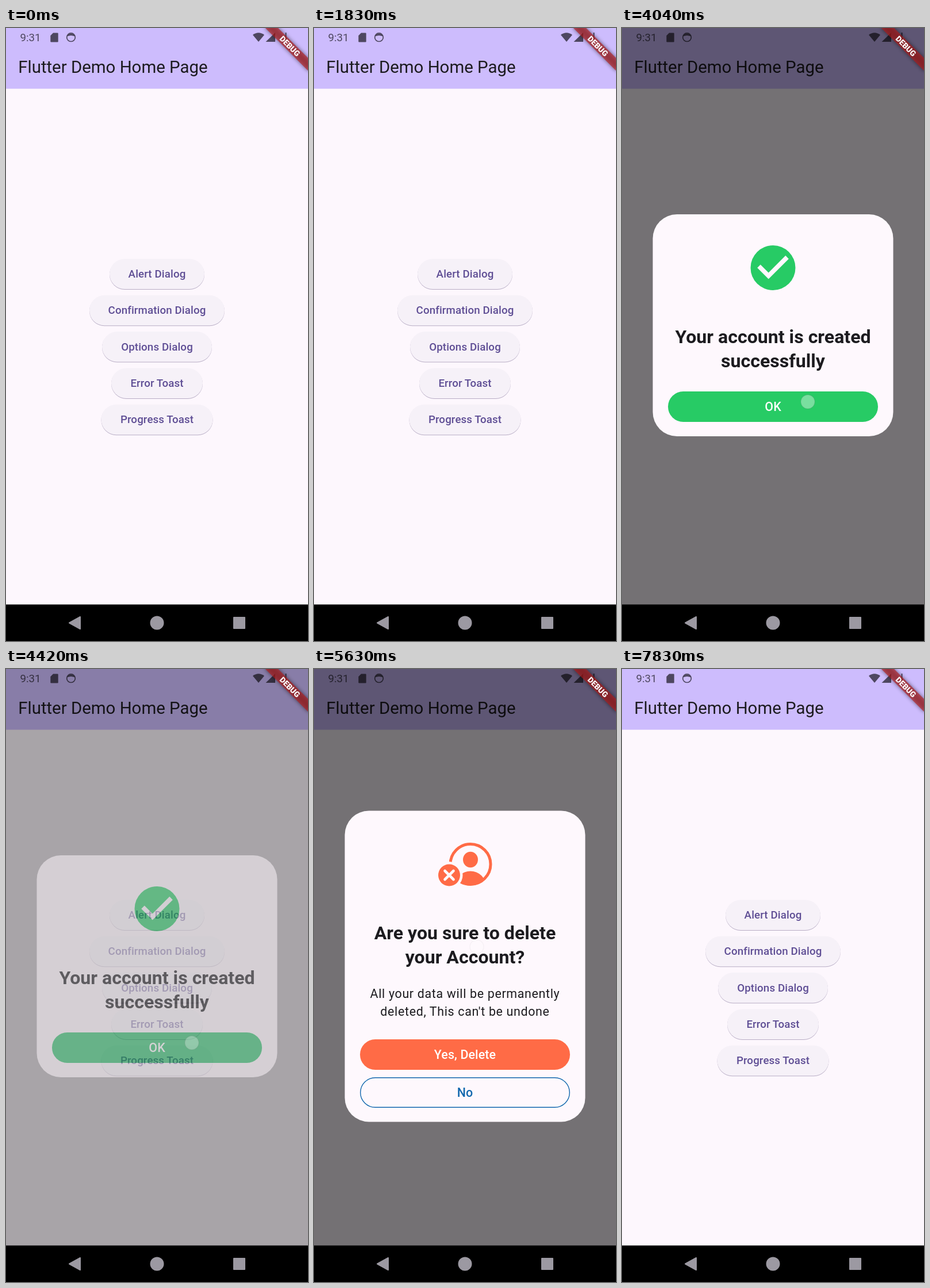
These frames come from a looping animation (525 px wide and 1066 px high, 8 s). An HTML page:

```html
<!DOCTYPE html>
<html lang="en">
<head>
<meta charset="utf-8">
<title>Dialog demo</title>
<style>
  html, body { margin: 0; width: 100%; height: 100%; overflow: hidden; background: #fdf7fd; }
  svg { display: block; width: 100%; height: 100%; }
  text { font-family: Roboto, sans-serif; }
  .mid { text-anchor: middle; }
  .label { font-size: 18.7px; font-weight: 500; letter-spacing: .13px; fill: #5f4e95; }
  .pill { fill: #f6f1f8; filter: drop-shadow(0 1px .7px rgba(40, 20, 80, .32)); }
  .head { font-size: 32.1px; font-weight: 700; fill: #1c1b1f; }
  .body { font-size: 21.4px; letter-spacing: .67px; fill: #1c1b1f; }
  .action { font-size: 21.4px; font-weight: 500; letter-spacing: .13px; fill: #fff; }
  .card { fill: #fef8fd; }
  .ink { fill: #6750a4; }
</style>
</head>
<body>
<svg viewBox="0 0 525 1066" preserveAspectRatio="none">
  <defs>
    <filter id="blur" x="-30%" y="-100%" width="160%" height="300%"><feGaussianBlur stdDeviation="3.5"/></filter>
    <clipPath id="face"><circle cx="272" cy="339.5" r="37"/></clipPath>
  </defs>

  <rect width="525" height="1066" fill="#fdf7fd"/>
  <rect width="525" height="105.6" fill="#cdbcfd"/>
  <g fill="#000" fill-opacity=".62">
    <text x="24.5" y="23.2" font-size="18.7">9:31</text>
    <path d="M82 8.5h7.5q1.2 0 1.2 1.2v13.6q0 1.2-1.2 1.2h-11q-1.2 0-1.2-1.2v-10z"/>
    <circle cx="113" cy="16.2" r="7.3" fill="none" stroke="#000" stroke-opacity=".62" stroke-width="1.7"/>
    <path d="M106.5 14.5a7 7 0 0 1 13 0q-3-1.5-6.5-1.5t-6.5 1.5z"/>
    <path d="M429 12q10-7.5 20 0l-10 12z"/>
    <path d="M468 8v16h-16.5z"/>
    <rect x="485.5" y="8" width="2" height="15"/>
  </g>
  <text x="21.3" y="78" font-size="29.4" fill="#1c1b1f">Flutter Demo Home Page</text>
  <g id="menu"></g>

  <rect id="barrier" width="525" height="1003"/>

  <g id="alert">
    <rect class="card" x="53.5" y="324" width="418" height="386" rx="42"/>
    <circle cx="262.5" cy="417" r="39" fill="#27cb65"/>
    <path class="card" transform="translate(215.7 370.2) scale(3.9)"
      d="M10 17l-5-5 1.41-1.41L10 14.17l7.59-7.59L19 8z"/>
    <text class="head mid" x="262.5" y="547.5">Your account is created</text>
    <text class="head mid" x="262.5" y="589.7">successfully</text>
    <rect x="80" y="632" width="365" height="53" rx="26.5" fill="#27cb65"/>
    <rect class="ink" x="80" y="632" width="365" height="53" rx="26.5"/>
    <text class="action mid" x="262.5" y="666">OK</text>
  </g>

  <g id="confirm">
    <rect class="card" x="53.5" y="246.5" width="418" height="541" rx="42"/>
    <g fill="#ff6b46">
      <circle cx="272" cy="339.5" r="35" fill="none" stroke="#ff6b46" stroke-width="5"/>
      <ellipse cx="272" cy="331.5" rx="13" ry="13.8"/>
      <ellipse cx="272" cy="378" rx="27" ry="26.5" clip-path="url(#face)"/>
      <circle class="card" cx="235" cy="358.5" r="23.5"/>
      <circle cx="235" cy="358.5" r="19"/>
      <path d="M227.5 351l15 15m0-15l-15 15" stroke="#fef8fd" stroke-width="4.6" stroke-linecap="round"/>
    </g>
    <text class="head mid" x="262.5" y="469.7">Are you sure to delete</text>
    <text class="head mid" x="262.5" y="511.9">your Account?</text>
    <text class="body mid" x="262.5" y="571.7">All your data will be permanently</text>
    <text class="body mid" x="262.5" y="603.3">deleted, This can't be undone</text>
    <rect x="80" y="644" width="365" height="53" rx="26.5" fill="#ff6b46"/>
    <rect class="ink" x="80" y="644" width="365" height="53" rx="26.5"/>
    <text class="action mid" x="262.5" y="678">Yes, Delete</text>
    <rect x="80.7" y="710.7" width="363.6" height="51.6" rx="25.8" fill="none" stroke="#1268ae" stroke-width="1.4"/>
    <text class="action mid" x="262.5" y="744" style="fill:#1268ae">No</text>
  </g>

  <g transform="translate(525 0) rotate(45)">
    <rect x="-53.5" y="36.7" width="107" height="15.8" fill-opacity=".5" filter="url(#blur)"/>
    <rect x="-53.5" y="36.7" width="107" height="15.8" fill="#b71c1c" fill-opacity=".63"/>
    <text class="mid" y="49.4" font-size="13.6" font-weight="900" fill="#fff">DEBUG</text>
  </g>

  <rect y="1002.5" width="525" height="63.5"/>
  <g fill="#9c99a2" stroke="#9c99a2" stroke-width="2" stroke-linejoin="round">
    <path d="M110 1034.5l19-10.5v21z"/>
    <circle cx="262.5" cy="1034.5" r="11"/>
    <rect x="396" y="1025" width="19" height="19"/>
  </g>

  <circle id="dot" r="12" fill="#fff" fill-opacity=".38" stroke="#777" stroke-opacity=".16" stroke-width="1.5"/>
</svg>
<script>
const LOOP = 8000, FADE = 150, LIFT = 200;
const $ = id => document.getElementById(id);

$('menu').innerHTML = [
  ['Alert Dialog', 165], ['Confirmation Dialog', 235], ['Options Dialog', 191],
  ['Error Toast', 159], ['Progress Toast', 194]
].map(([name, w], i) => {
  const y = 428 + i * 63.3;
  return `<rect class="pill" x="${262.5 - w / 2}" y="${y - 26.5}" width="${w}" height="52.5" rx="26.2"/>
    <text class="label mid" x="262.5" y="${y + 6}">${name}</text>`;
}).join('');

// Each tap acts when the finger lifts.
const taps = [
  { down: 2630, up: 2770, x: 295, y: 424 },
  { down: 4040, up: 4325, x: 323, y: 650 },
  { down: 5380, up: 5470, x: 283, y: 483 },
  { down: 7080, up: 7380, x: 334, y: 679 }
];
const dialogs = [
  { el: $('alert'), open: taps[0], close: taps[1] },
  { el: $('confirm'), open: taps[2], close: taps[3] }
];

const clamp = v => Math.min(1, Math.max(0, v));

function bezier(x1, y1, x2, y2) {
  const at = (a, b, s) => 3 * a * s * (1 - s) ** 2 + 3 * b * s * s * (1 - s) + s ** 3;
  return x => {
    let lo = 0, hi = 1;
    for (let i = 0; i < 20; i++) {
      const s = (lo + hi) / 2;
      if (at(x1, x2, s) < x) lo = s; else hi = s;
    }
    return at(y1, y2, (lo + hi) / 2);
  };
}
const ease = bezier(.25, .1, .25, 1), easeOut = bezier(0, 0, .58, 1);

function draw(t) {
  let shade = 0;
  for (const { el, open, close } of dialogs) {
    const v = clamp((t - open.up) / FADE) - clamp((t - close.up) / FADE);
    el.style.display = v > 0 ? '' : 'none';
    el.style.opacity = v > 0 ? easeOut(v) : 0;
    if (v > 0) shade = ease(v) * .54;
    const press = clamp((t - close.down) / 200) - clamp((t - close.up) / LIFT);
    el.querySelector('.ink').style.opacity = press * .16;
  }
  $('barrier').style.opacity = shade;

  const tap = taps.find(p => t >= p.down && t < p.up + LIFT);
  const dot = $('dot');
  dot.style.opacity = tap ? 1 - clamp((t - tap.up) / LIFT) ** 2 : 0;
  if (tap) {
    dot.setAttribute('cx', tap.x);
    dot.setAttribute('cy', tap.y);
  }
}

const start = performance.now();
function frame() {
  draw((performance.now() - start) % LOOP);
  requestAnimationFrame(frame);
}
frame();
</script>
</body>
</html>
```
